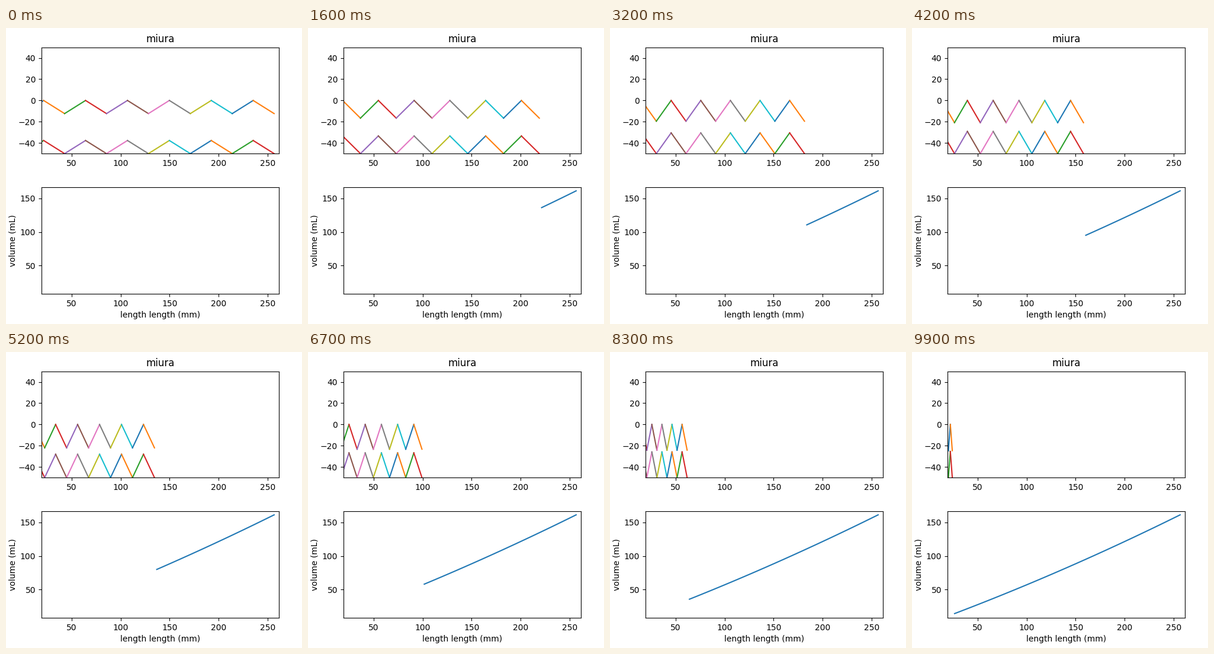
A matplotlib script for the animation above (10000 ms loop, 500 px wide and 500 px high).

```python
import matplotlib.pyplot as plt
import numpy as np
from matplotlib.animation import FuncAnimation

SIZE = 500
FRAMES = 100
CELLS = 6
SIDE = 24.7    # panel length in mm
DEPTH = 50     # distance between the two outer edges
PAD = 5

count = 2 * CELLS
lengths = np.linspace(count * SIDE * np.sin(np.pi / 3), 24.1, FRAMES)
volumes = lengths * (0.535 + 0.00036 * lengths)


def add_panel(fig, bottom, ylim):
    box = np.array([59.8, bottom, 401.4, 179.6]) / SIZE
    return fig.add_axes(box, xlim=(lengths[-1] - PAD, lengths[0] + PAD), ylim=ylim)


fig = plt.figure(figsize=(5, 5), dpi=100, facecolor="white")
fold_ax = add_panel(fig, 287.8, (-50, 50))
fold_ax.set_title("miura")
vol_ax = add_panel(fig, 51, (volumes[-1] - PAD, volumes[0] + PAD))
vol_ax.set_xlabel("length length (mm)")
vol_ax.set_ylabel("volume (mL)")

# One line per panel, so that each takes the next colour of the cycle
upper = [fold_ax.plot([], [])[0] for _ in range(count)]
lower = [fold_ax.plot([], [])[0] for _ in range(count)]
curve, = vol_ax.plot([], [])


def update(frame):
    step = lengths[frame] / count
    height = np.sqrt(SIDE**2 - step**2)
    x = step * np.arange(count + 1)
    ridge = height * (np.arange(count + 1) % 2)
    for lines, base in ((upper, -height), (lower, -DEPTH)):
        y = base + ridge
        for i, line in enumerate(lines):
            line.set_data(x[i:i + 2], y[i:i + 2])
    curve.set_data(lengths[:frame], volumes[:frame])
    return [*upper, *lower, curve]


anim = FuncAnimation(fig, update, frames=FRAMES, interval=100, repeat=True)
plt.show()
```
